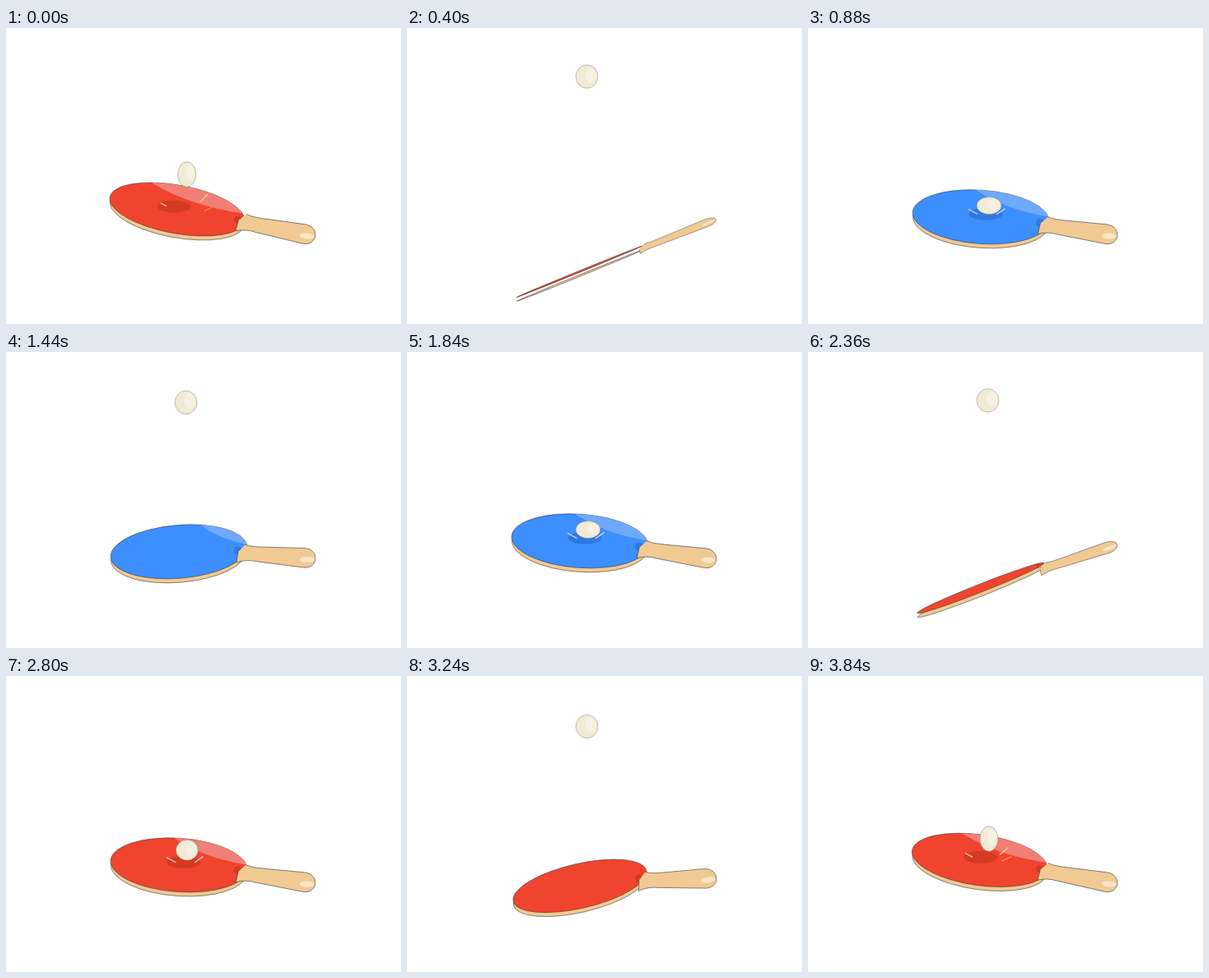
An HTML page with a canvas for the animation above (3.88 s loop, 480x360 px).

```html
<!DOCTYPE html>
<html>
<head>
<meta charset="utf-8">
<title>Table tennis</title>
<style>
html, body { margin: 0; width: 100%; height: 100%; overflow: hidden; background: #fff; }
canvas { display: block; }
</style>
</head>
<body>
<canvas id="stage" width="480" height="360"></canvas>
<script>
const ctx = document.getElementById('stage').getContext('2d');
const LOOP = 3880, STEP = 40, BOUNCE = 970, LEAD = 90;
const REST = 4, KICK = 11, KICK_TIME = 130;
const WOOD = '#f0ca92', OUTLINE = 'rgba(55,55,62,.72)';
const RED = { face: '#f0442e', sheen: '#f08076', shade: '#d53a22' };
const BLUE = { face: '#3d8eff', sheen: '#6fa9fb', shade: '#2f79e0' };

const lerp = (a, b, k) => a + (b - a) * k;
const clamp = k => Math.max(0, Math.min(1, k));
const easeOut = k => Math.sin(clamp(k) * Math.PI / 2);
const easeInOut = k => (1 - Math.cos(clamp(k) * Math.PI)) / 2;

// Each bounce swings the blade down to a lowest tilt and rolls it about the handle.
const halfTurn = p => Math.PI * easeInOut((p - 330) / 320);
const rock = p => 1.2 * Math.sin(Math.PI * clamp((p - 530) / 340)) ** 2;
const level = () => 0;
const beats = [
  { lowTime: 430, lowTilt: -23, roll: halfTurn, up: RED, down: BLUE },
  { lowTime: 280, lowTilt: -9.5, roll: level, up: BLUE, down: RED },
  { lowTime: 430, lowTilt: -23, roll: halfTurn, up: BLUE, down: RED },
  { lowTime: 700, lowTilt: -22.5, roll: rock, up: RED, down: BLUE }
];

function tiltAt(p, { lowTime, lowTilt }) {
  if (p < KICK_TIME) return lerp(REST, KICK, easeOut(p / KICK_TIME));
  if (p < lowTime) return lerp(KICK, lowTilt, easeOut((p - KICK_TIME) / (lowTime - KICK_TIME)));
  return lerp(lowTilt, REST, easeInOut((p - lowTime) / (BOUNCE - lowTime)));
}

// The whole paddle follows from its tilt and roll.
function poseAt(p, beat) {
  const tilt = tiltAt(p, beat);
  const facing = Math.cos(beat.roll(p));
  const edge = 1 - Math.abs(facing);
  return {
    tilt,
    side: facing > 0 ? beat.up : beat.down,
    x: 210 - Math.max(0, tilt - REST) / 3,
    y: 235.8 - 1.5 * tilt + 27 * edge,
    half: Math.max(1, (33.2 - .036 * tilt * tilt) * Math.abs(facing)),
    neck: 242 - .55 * tilt + 13 * edge,
    end: 251 - .03 * Math.min(0, tilt) ** 2,
    width: 1 - .6 * edge
  };
}

function ellipse(x, y, rx, ry, angle = 0) {
  ctx.beginPath();
  ctx.ellipse(x, y, rx, ry, angle, 0, Math.PI * 2);
}

function paint(fill, stroke, width = .8) {
  ctx.fillStyle = fill;
  ctx.fill();
  if (stroke) {
    ctx.strokeStyle = stroke;
    ctx.lineWidth = width;
    ctx.stroke();
  }
}

function drawHandle(q) {
  const dx = 78, dy = q.end - q.neck, length = Math.hypot(dx, dy);
  ctx.save();
  ctx.translate(288, q.neck);
  ctx.rotate(Math.atan2(dy, dx));
  ctx.scale(1, q.width);
  ctx.beginPath();
  ctx.moveTo(2, -10.5);
  ctx.quadraticCurveTo(9, -8.5, 20, -9);
  ctx.lineTo(length - 6, -11.5);
  ctx.bezierCurveTo(length + 15, -13, length + 15, 13, length - 4, 12);
  ctx.lineTo(18, 9);
  ctx.quadraticCurveTo(4, 7, -7, 12);
  ctx.lineTo(-6, -1);
  paint(WOOD, OUTLINE);
  ellipse(length, 2, 9, 3.5, -.1);
  paint('rgba(255,245,225,.65)');
  ctx.restore();
}

function drawBlade(q, near) {
  const angle = q.tilt * Math.PI / 180;
  ellipse(q.x, q.y + 5, 82.5, q.half, angle);
  paint(WOOD, OUTLINE);
  ellipse(q.x, q.y, 83, q.half, angle);
  paint(q.side.face, OUTLINE);

  ctx.save();
  ctx.clip();
  if (q.tilt > -9) {
    const start = 217 - 3.8 * q.tilt;
    const top = q.y - q.half - 2;
    ctx.beginPath();
    ctx.moveTo(start, top);
    ctx.quadraticCurveTo((start + 272) / 2, q.neck - 19, 294, q.neck - 10);
    ctx.lineTo(300, top - 20);
    ctx.lineTo(start, top - 20);
    paint(q.side.sheen);
  }
  ellipse(282, q.neck - 3, 5, 5 * q.width);
  paint(q.side.shade);
  if (near > -50 && near < 130) {
    ellipse(216 - .13 * Math.max(0, near), q.y - 3.5, 20.5, 7.5);
    paint(q.side.shade);
  }
  ctx.restore();
}

function spark(x, y, angle, length, color) {
  ctx.beginPath();
  ctx.moveTo(x, y);
  ctx.lineTo(x + length * Math.cos(angle), y + length * Math.sin(angle));
  ctx.strokeStyle = color;
  ctx.lineWidth = 1.2;
  ctx.stroke();
}

// Sparks drift outwards and fade into warm colours after the impact.
function drawSparks(q, near) {
  if (near < -30 || near > 115) return;
  const k = clamp(near / 90);
  const warm = near > 30;
  spark(195 - 7 * k, q.y - 9.5 + 2 * k, .5, 13 - 5 * k, warm ? '#f6dca0' : '#cfe0ee');
  spark(229 + 7 * k, q.y - 3 - 6 * k, -.6 - .2 * k, 13, warm ? '#f7d48c' : '#cfe0ee');
  if (warm) spark(228 + 13 * k, q.y + 2 * k, -.42, 17 - 7 * k, '#f59a58');
}

function ballAt(near, p) {
  if (Math.abs(near) < 30) {
    const k = clamp((30 - Math.abs(near)) / 18);
    return { x: 220, y: lerp(206.5, 216, k), rx: lerp(11.5, 15, k), ry: lerp(15, 10.5, k) };
  }
  // The ball hangs briefly at the top, leaves slowly and falls freely.
  const u = p - BOUNCE / 2;
  const s = Math.max(0, Math.abs(u) - 20) / 435;
  const drop = u < 0 ? 230 * s ** 2 - 81 * s ** 3 : 148 * s ** 2;
  const stretch = clamp(1.15 * s) ** 2;
  return { x: lerp(218.5, 220, s), y: 59 + drop, rx: lerp(13.5, 11, stretch), ry: lerp(14.2, 15.3, stretch) };
}

function drawBall({ x, y, rx, ry }) {
  ellipse(x, y, rx, ry);
  paint('#f0ead6', 'rgba(90,95,95,.5)', .7);
  ellipse(x + rx * .35, y - ry * .12, rx * .5, ry * .65);
  paint('rgba(248,244,232,.6)');
}

function draw(t) {
  const beat = beats[Math.floor((t + LEAD) / BOUNCE) % beats.length];
  const p = (t + LEAD) % BOUNCE;
  const near = p > BOUNCE / 2 ? p - BOUNCE : p;
  const pose = poseAt(p, beat);
  ctx.fillStyle = '#fff';
  ctx.fillRect(0, 0, 480, 360);
  drawBlade(pose, near);
  drawHandle(pose);
  drawSparks(pose, near);
  drawBall(ballAt(near, p));
}

const began = performance.now();
function tick() {
  const elapsed = performance.now() - began;
  draw(Math.floor(elapsed / STEP) * STEP % LOOP);
  requestAnimationFrame(tick);
}
tick();
</script>
</body>
</html>
```
